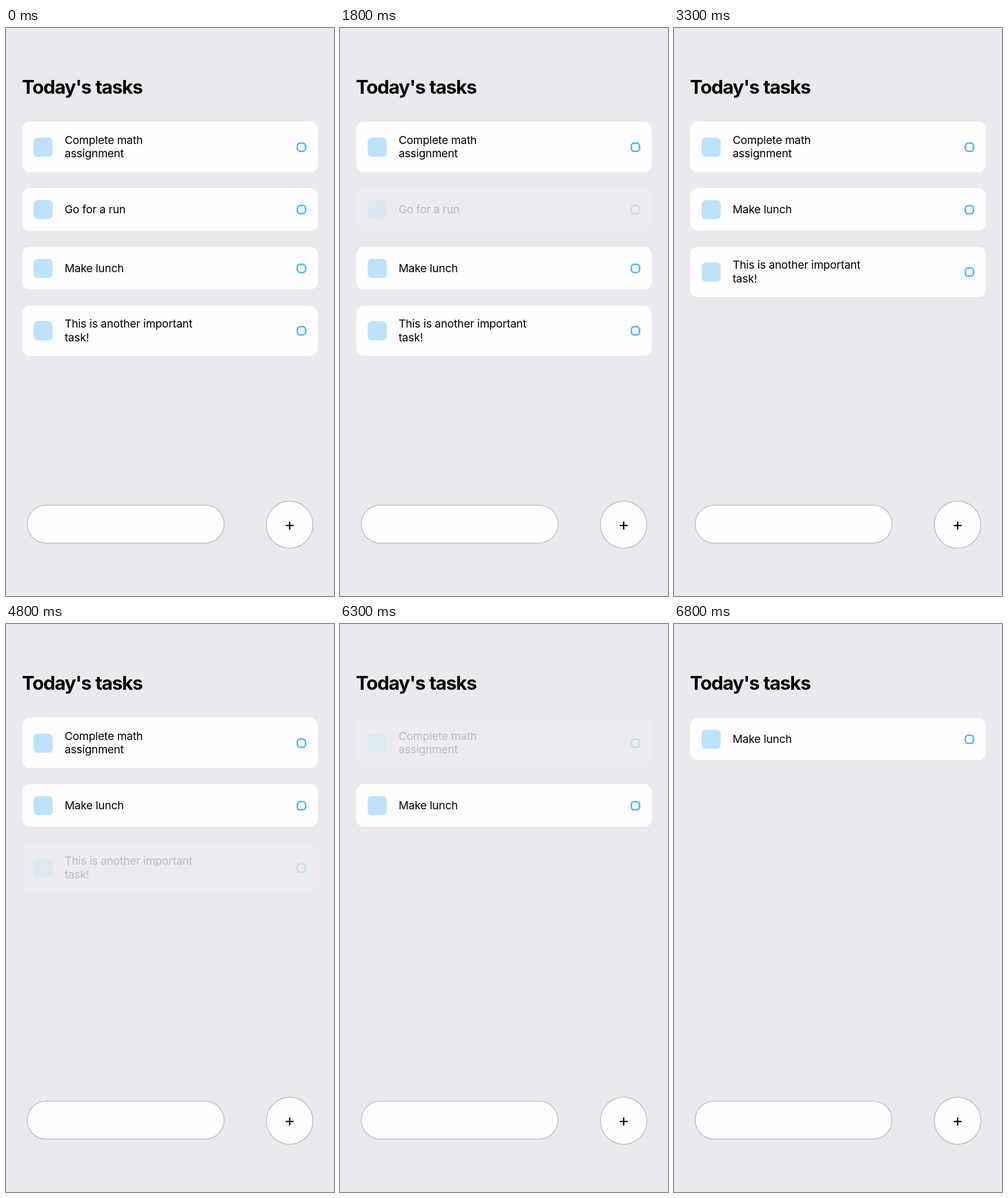
An HTML page that plays this animation: 569x984 px, repeating every 8000 ms.

```html
<!DOCTYPE html>
<html lang="en">
<head>
<meta charset="utf-8">
<title>Today's tasks</title>
<style>
  html, body { margin: 0; width: 100%; height: 100%; overflow: hidden; }
  body {
    --card: #fffdff;
    --faded: #fff4fc;
    position: relative;
    background: #e8eaed;
    color: #000;
    font: 19.24px/23.2px Inter, "Noto Sans", sans-serif;
  }
  h1 {
    position: absolute; left: 27.5px; top: 82px; margin: 0;
    font-size: 33px; line-height: 40px; font-weight: 700;
    letter-spacing: -1.2px; word-spacing: 1px; white-space: nowrap;
  }
  .list { position: absolute; left: 27.7px; top: 162.4px; width: 513.8px; }
  .task {
    display: flex; align-items: center; box-sizing: border-box;
    margin-bottom: 27.5px; padding: 20.6px 20.2px;
    background: var(--card); border-radius: 13.7px;
    letter-spacing: -.2px; white-space: nowrap;
    animation: 8s step-end infinite;
  }
  .icon {
    width: 33px; height: 33px; margin-right: 20.8px;
    background: #bbe3fd; border-radius: 6.9px;
  }
  /* inset shadows keep fractional line widths */
  .check {
    width: 17px; height: 17px; margin-left: auto;
    border-radius: 6.5px; box-shadow: inset 0 0 0 2.75px #55b7f0;
  }
  .field, .add {
    position: absolute; background: var(--card);
    border-radius: 50px; box-shadow: inset 0 0 0 1.37px #b8b6b9;
  }
  .field { left: 36px; top: 826.3px; width: 343px; height: 67px; }
  .add {
    left: 450.8px; top: 819.2px; width: 82.4px; height: 82.4px;
    font-size: 29px; line-height: 82px; text-align: center;
  }

  /* 1.25% is one 100 ms step */
  .math { animation-name: math; }
  .run { animation-name: run; }
  .lunch { animation-name: lunch; }
  .important { animation-name: important; }

  @keyframes math {
    0% { opacity: 1; }
    78.75% { opacity: .2; background: var(--faded); }
    80%, 100% { opacity: 0; }
  }
  @keyframes run {
    0% { opacity: 1; }
    21.25% { opacity: .21; background: var(--faded); }
    23.75%, 100% { opacity: 0; }
  }
  @keyframes lunch {
    0% { opacity: 1; transform: none; background: var(--card); }
    23.75% { opacity: .27; transform: translateY(-101.7px); background: var(--faded); }
    25% { opacity: .76; transform: translateY(-101.7px); background: var(--card); }
    26.25% { opacity: 1; transform: translateY(-101.7px); background: var(--card); }
    80% { opacity: .27; transform: translateY(-216.7px); background: var(--faded); }
    81.25% { opacity: .76; transform: translateY(-216.7px); background: var(--card); }
    82.5%, 100% { opacity: 1; transform: translateY(-216.7px); background: var(--card); }
  }
  @keyframes important {
    0% { opacity: 1; transform: none; background: var(--card); }
    23.75% { opacity: 1; transform: translateY(-101.7px); background: var(--card); }
    60% { opacity: .2; transform: translateY(-101.7px); background: var(--faded); }
    61.25%, 100% { opacity: 0; transform: translateY(-101.7px); }
  }
</style>
</head>
<body>
  <h1>Today's tasks</h1>
  <div class="list">
    <div class="task math"><i class="icon"></i><span>Complete math<br>assignment</span><i class="check"></i></div>
    <div class="task run"><i class="icon"></i><span>Go for a run</span><i class="check"></i></div>
    <div class="task lunch"><i class="icon"></i><span>Make lunch</span><i class="check"></i></div>
    <div class="task important"><i class="icon"></i><span>This is another important<br>task!</span><i class="check"></i></div>
  </div>
  <div class="field"></div>
  <div class="add">+</div>
</body>
</html>
```
